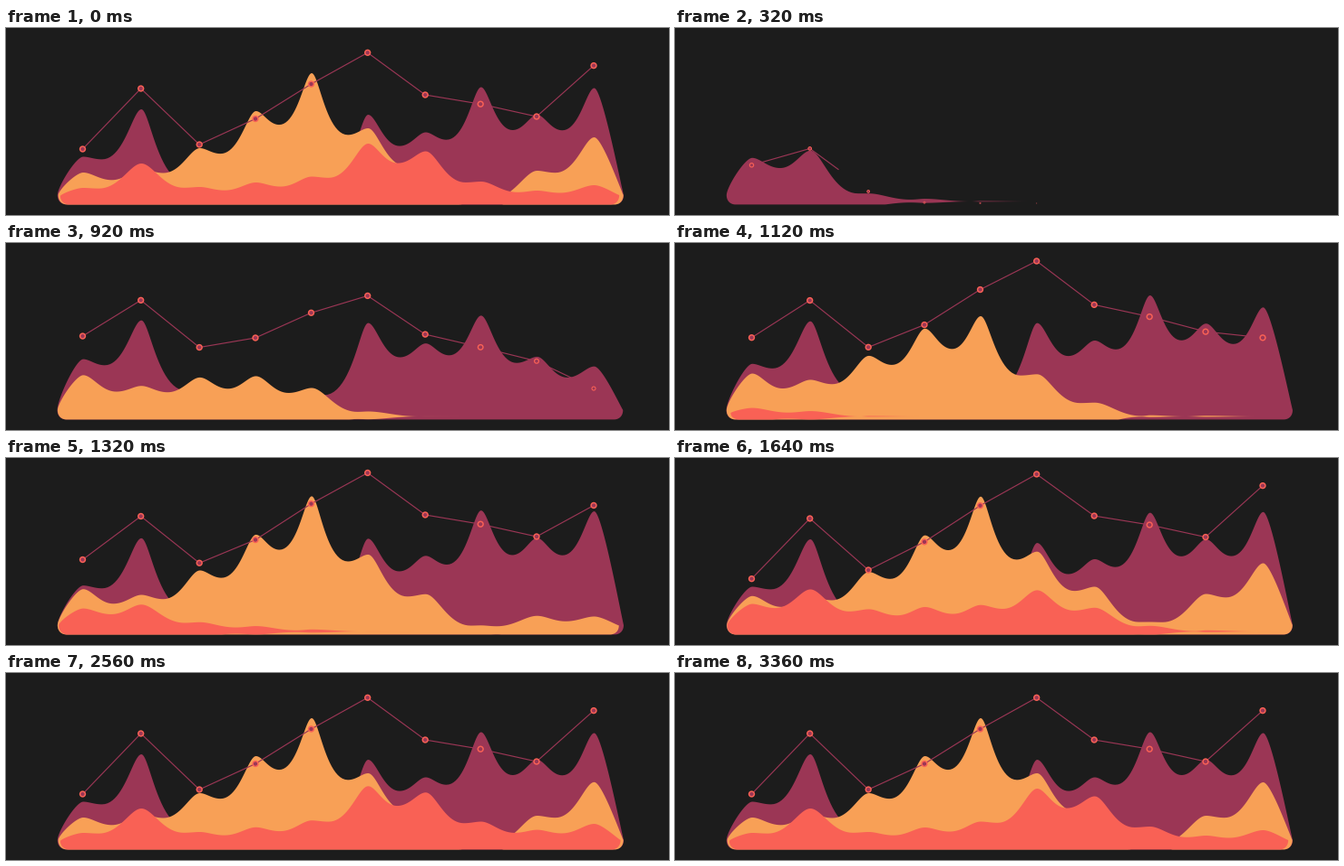
A matplotlib script that plays this animation: 731 px wide and 207 px high, repeating every 4360 ms.

```python
import numpy as np
import matplotlib.pyplot as plt
from matplotlib.animation import FuncAnimation
from matplotlib.patches import Circle, Polygon

W, H, DPI = 731, 207, 64
STEP, FRAMES = 40, 109
REST = 3360  # everything has settled by this time
SETTLE = 900
PX = 72 / DPI
BG, WINE, AMBER, CORAL = "#1c1c1c", "#9b3655", "#f8a056", "#f96155"
BASE = 192

I = np.arange(10)
X = np.array([84.5, 148.7, 213.2, 275, 336.5, 398.7, 462.2, 523.2, 585, 648])
AX = X + 0.6

# Settled heights above the floor
WINE_DATA = [49.5, 102, 20, 16, 16, 96, 76.5, 126.5, 96, 125.5]
AMBER_DATA = [32, 36, 59, 100, 142, 81, 42, 3, 34, 71]
CORAL_DATA = [15, 42, 16, 21, 27.5, 64, 55.5, 22, 12, 18]
LINE_DATA = [60, 127, 65, 93.5, 132, 166.7, 120, 109.8, 96, 152.4]


def ease(u):
    return (1 - np.cos(np.pi * np.clip(u, 0, 1))) / 2


class Wave:
    """Points rise one after another past their height, then sink back."""

    def __init__(self, data, mid, rise, lift, kick):
        self.data = np.array(data)
        self.start, self.rise = mid - rise / 2, rise
        self.extra = lift + kick * np.cos(np.pi * I) * np.exp(-I)

    def at(self, t):
        u = (t - self.start) / self.rise
        sink = np.clip((t - self.start - self.rise) / SETTLE, 0, 1)
        return ease(u) * (self.data + self.extra * (1 - ease(sink ** 2)))


def bezier(p0, p1, p2, p3, n=24):
    u = np.linspace(0, 1, n)[:, None]
    p0, p1, p2, p3 = map(np.array, (p0, p1, p2, p3))
    return ((1 - u) ** 3 * p0 + 3 * u * (1 - u) ** 2 * p1
            + 3 * u * u * (1 - u) * p2 + u ** 3 * p3)


def slope(px, pg, vx, vg):
    """From a peak down to a valley; the taller, the sharper the peak."""
    drop, w = pg - vg, vx - px
    tip = max(0.15, 0.3 - 0.0015 * drop)
    flat = min(0.65, 0.4 + 0.003 * drop)
    return bezier((px, pg), (px + tip * w, pg), (vx - flat * w, vg), (vx, vg))


def hills(g):
    parts = []
    for i in range(len(g) - 1):
        low, high = sorted(g[i:i + 2])
        ratio = low / max(high, 0.01)
        vg = max(0, min(low, low * (1.19 - 0.47 * ratio) - 1))
        f = min(0.5, 0.12 + 0.42 * ratio)
        if g[i] > g[i + 1]:
            f = 1 - f
        vx = AX[i] + f * (AX[i + 1] - AX[i])
        parts += [slope(AX[i], g[i], vx, vg),
                  slope(AX[i + 1], g[i + 1], vx, vg)[::-1]]
    return np.vstack(parts)


def floor_y(g):
    return BASE + 3.4 * np.clip(g / 6, 0, 1)


def cap(x, g, edge, side, lean):
    """Outer flank and rounded foot, from the end point to the floor."""
    y, low = BASE - g, floor_y(g)
    knee = BASE - min(7, 0.4 * g)
    flank = bezier((x, y), (x + 8 * side, y),
                   (edge - lean * side, y + 0.78 * (knee - y)), (edge, knee))
    foot = bezier((edge, knee), (edge, knee + 0.6 * (low - knee)),
                  (edge - 4 * side, low), (edge - 10 * side, low))
    return np.vstack([flank, foot])


def outline(g):
    x, top = hills(g).T
    left = cap(AX[0], g[0], 56.4 + 9 * np.exp(-g[0] / 16), -1, 0)
    right = cap(AX[-1], g[-1], 681 - 12 * np.exp(-g[-1] / 20), 1, 6)
    return np.vstack([left[::-1], np.c_[x, BASE - top], right,
                      np.c_[x, floor_y(top)][::-1]])


def trimmed(x, y, part):
    dist = np.r_[0, np.cumsum(np.hypot(np.diff(x), np.diff(y)))]
    end = part * dist[-1]
    keep = dist < end
    return (np.r_[x[keep], np.interp(end, dist, x)],
            np.r_[y[keep], np.interp(end, dist, y)])


fig = plt.figure(figsize=(W / DPI, H / DPI), dpi=DPI, facecolor=BG)
ax = fig.add_axes([0, 0, 1, 1])
ax.set_xlim(0, W)
ax.set_ylim(H, 0)
ax.axis("off")

areas = []
for k, (color, data) in enumerate([(WINE, WINE_DATA), (AMBER, AMBER_DATA),
                                   (CORAL, CORAL_DATA)]):
    shape = Polygon([(0, 0), (0, 0), (0, 0)], fc=color, ec="none", zorder=k + 1)
    wave = Wave(data, 230 + 480 * k + 80 * I, 560, 7.5, 8)
    areas.append((ax.add_patch(shape), wave))

line, = ax.plot([], [], color=WINE, lw=1.15 * PX, zorder=5)
line_wave = Wave(LINE_DATA, np.interp(I, [0, 1, 3, 8, 9],
                                      [340, 340, 700, 870, 1095]), 860, 11, 20)
dots = [ax.add_patch(Circle((x, 0), 1, fc=WINE, ec=CORAL, zorder=6)) for x in X]


def draw(n):
    t = n * STEP if n else REST
    for shape, wave in areas:
        g = wave.at(t)
        shape.set_xy(outline(g))
        shape.set_visible(bool(g.max() > 0.05))

    ys = BASE + 2 - line_wave.at(t)
    line.set_data(*trimmed(X, ys, ease((t - 40) / 1000)))

    sizes = np.clip((t + 100 - 70 * I) / 560, 0, 1)
    for dot, x, y, s in zip(dots, X, ys, sizes):
        dot.center = x, y
        dot.radius = 2.9 * s
        dot.set_linewidth(1.5 * s * PX)
        dot.set_visible(bool(s > 0))
    return [line, *dots]


anim = FuncAnimation(fig, draw, frames=FRAMES, interval=STEP,
                     init_func=lambda: draw(0), repeat=True, repeat_delay=0)
plt.show()
```
